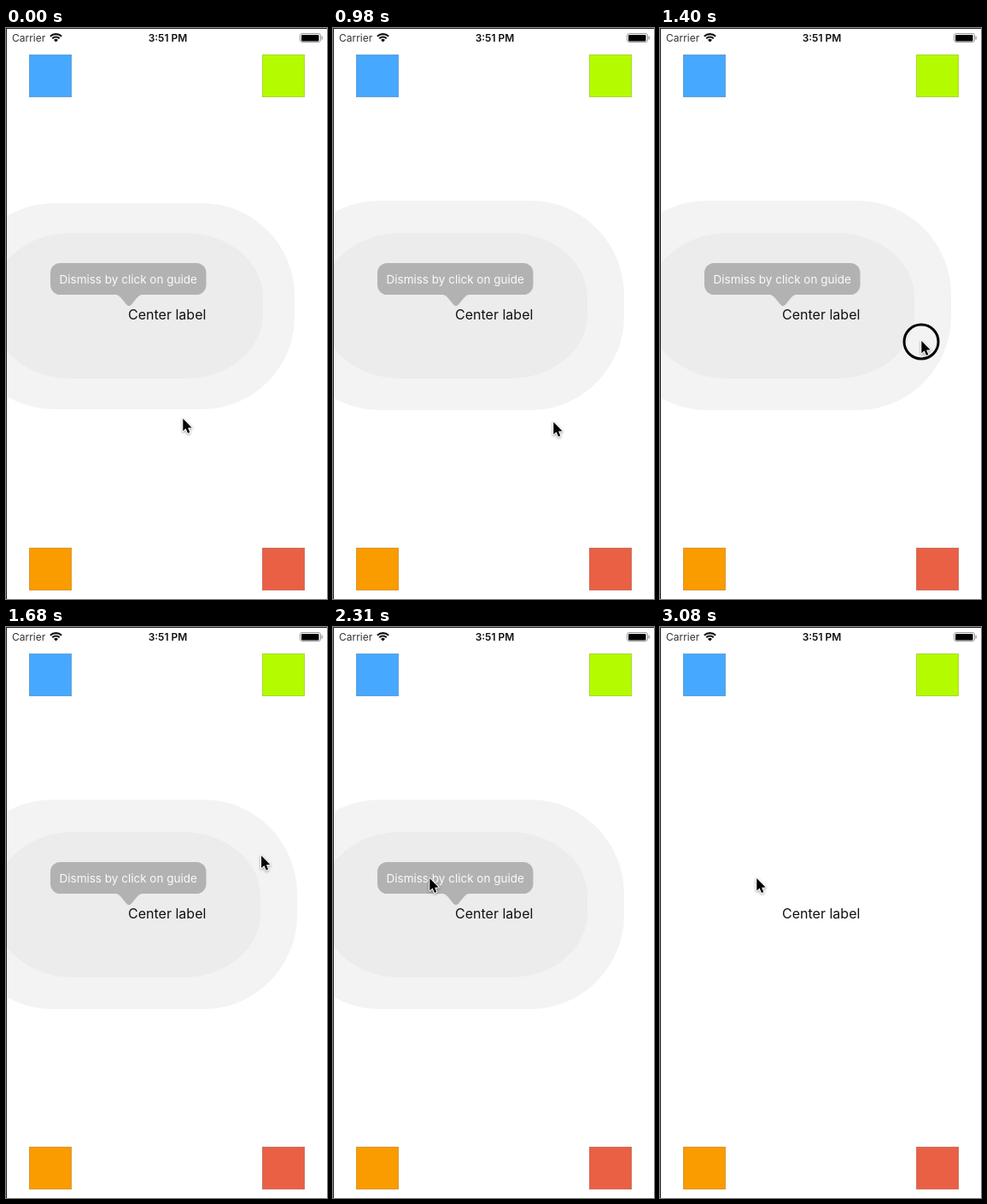
Animation, 376 px wide and 668 px high, one loop 4060 ms. Source, as an HTML page with a canvas:

```html
<!DOCTYPE html>
<html lang="en">
<head>
<meta charset="utf-8">
<title>Guide tooltip</title>
<style>
  html, body { margin: 0; width: 100%; height: 100%; overflow: hidden; background: #fff; }
  canvas { display: block; width: 376px; height: 668px; }
</style>
</head>
<body>
<canvas id="stage" width="376" height="668"></canvas>
<script>
const ctx = document.getElementById('stage').getContext('2d');
const W = 376, H = 668, LOOP = 4060, STEP = 70, DISMISS = 3080;
const FONT = 'Inter, Roboto, sans-serif';

// Pointer stops: time, x, y
const stops = [
  [0, 207, 457], [140, 207, 457], [280, 211, 458], [350, 211, 458],
  [630, 220, 486], [700, 220, 486], [980, 258, 461], [1260, 264, 413],
  [1330, 306, 366], [1470, 306, 366], [1820, 294, 202], [1890, 283, 219],
  [2310, 113, 294], [LOOP, 113, 294]
];
const clicks = [[1400, 306, 367], [2940, 113, 295]];

const squares = [
  [27, 31, '#46a8ff'], [300, 31, '#b5fb00'],
  [27, 608, '#fa9b00'], [300, 608, '#e96045']
];

function pointerAt(t) {
  const i = stops.findIndex((s, k) => k > 0 && t <= s[0]);
  const [t0, x0, y0] = stops[i - 1], [t1, x1, y1] = stops[i];
  const k = (t - t0) / (t1 - t0);
  return [x0 + (x1 - x0) * k, y0 + (y1 - y0) * k];
}

function text(str, x, y, size, color, align = 'left', weight = 400) {
  ctx.font = `${weight} ${size}px ${FONT}`;
  ctx.textAlign = align;
  ctx.fillStyle = color;
  ctx.fillText(str, x, y);
}

function rounded(x, y, w, h, r, color) {
  ctx.beginPath();
  ctx.roundRect(x, y, w, h, r);
  ctx.fillStyle = color;
  ctx.fill();
}

function wifi(x, y) {
  ctx.strokeStyle = ctx.fillStyle = '#111';
  ctx.lineWidth = 2.1;
  const a = Math.PI / 4;
  for (const r of [9.4, 6]) {
    ctx.beginPath();
    ctx.arc(x, y, r, -Math.PI / 2 - a, -Math.PI / 2 + a);
    ctx.stroke();
  }
  ctx.beginPath();
  ctx.moveTo(x, y);
  ctx.arc(x, y, 3.6, -Math.PI / 2 - a, -Math.PI / 2 + a);
  ctx.fill();
}

function battery() {
  ctx.beginPath();
  ctx.roundRect(344.5, 6.5, 24, 10, 2.5);
  ctx.strokeStyle = '#999';
  ctx.lineWidth = 1;
  ctx.stroke();
  rounded(346, 8, 20.5, 7.5, 1.2, '#000');
  rounded(369.5, 9.5, 1.3, 4, 0.6, '#999');
}

function screen() {
  ctx.fillStyle = '#fff';
  ctx.fillRect(0, 0, W, H);
  text('Carrier', 7, 15.7, 12, '#333');
  wifi(58.5, 16.5);
  text('3:51 PM', 189.5, 15.7, 12, '#111', 'center', 600);
  battery();
  for (const [x, y, color] of squares) {
    ctx.fillStyle = color;
    ctx.fillRect(x, y, 50, 50);
    ctx.strokeStyle = 'rgba(150,150,150,0.35)';
    ctx.lineWidth = 1;
    ctx.strokeRect(x + 0.5, y + 0.5, 49, 49);
  }
}

function halo(right, top, bottom, rx, ry, color) {
  rounded(286 - right, top, 2 * right - 286, bottom - top, { x: rx, y: ry }, color);
}

function guide(t) {
  if (t < 770) {
    halo(338, 205, 446, 108, 108, '#f3f3f3');
    halo(301, 240, 410, 90, 75, '#ececec');
  } else {
    halo(t < 2940 ? 341 : 339, 202, 447, 110, 110, '#f3f3f3');
    halo(298, 240, 410, 90, 75, '#ececec');
  }
  rounded(52, 275, 182.5, 37, 11.5, '#b2b2b2');
  ctx.beginPath();
  ctx.moveTo(127, 311.5);
  ctx.quadraticCurveTo(131.5, 312, 134.5, 315.5);
  ctx.lineTo(141, 323.5);
  ctx.quadraticCurveTo(144, 327, 147, 323.5);
  ctx.lineTo(153.5, 315.5);
  ctx.quadraticCurveTo(156.5, 312, 161, 311.5);
  ctx.fill();
  text('Dismiss by click on guide', 143.2, 298.7, 13.5, '#fafafa', 'center');
}

function pointer(x, y) {
  const pts = [[0, 0], [0, 14.5], [3.3, 11.5], [5.7, 17], [8, 16], [5.8, 10.7], [10.3, 10.4]];
  ctx.save();
  ctx.translate(x + 0.3, y);
  ctx.beginPath();
  pts.forEach(p => ctx.lineTo(...p));
  ctx.closePath();
  ctx.lineJoin = 'round';
  ctx.lineWidth = 2;
  ctx.strokeStyle = '#fff';
  ctx.shadowColor = 'rgba(0,0,0,0.4)';
  ctx.shadowBlur = 3;
  ctx.shadowOffsetY = 1;
  ctx.stroke();
  ctx.shadowColor = 'transparent';
  ctx.fillStyle = '#000';
  ctx.fill();
  ctx.restore();
}

function draw(t) {
  screen();
  if (t < DISMISS) guide(t);
  text('Center label', 188.7, 340.8, 16, '#111', 'center');
  ctx.fillStyle = '#222';
  ctx.fillRect(0, 0, 1, H);
  ctx.fillRect(0, 0, W, 1);
  for (const [at, x, y] of clicks) {
    if (t < at || t >= at + STEP) continue;
    ctx.beginPath();
    ctx.arc(x, y, 20, 0, 2 * Math.PI);
    ctx.lineWidth = 3;
    ctx.strokeStyle = '#000';
    ctx.stroke();
  }
  pointer(...pointerAt(t));
}

const start = performance.now();
function tick() {
  const t = (performance.now() - start) % LOOP;
  draw(Math.floor(t / STEP) * STEP);
  requestAnimationFrame(tick);
}
tick();
</script>
</body>
</html>
```
